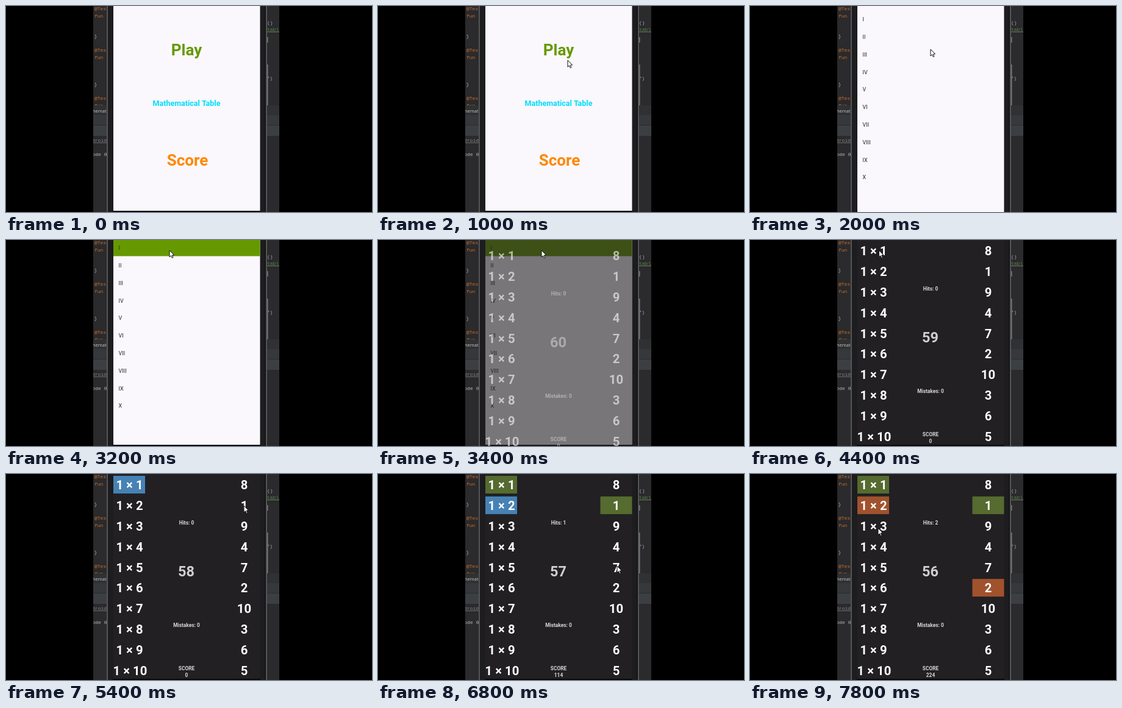
An HTML page with a canvas for the animation above (8 s loop, 600 by 338 pixels).

```html
<!DOCTYPE html>
<html lang="en">
<head>
<meta charset="utf-8">
<title>Times table game</title>
<style>
html, body { margin: 0; width: 100%; height: 100%; overflow: hidden; background: #000; }
canvas { display: block; width: 600px; height: 338px; }
</style>
</head>
<body>
<canvas id="stage" width="600" height="338"></canvas>
<script>
const ctx = document.getElementById('stage').getContext('2d');
const LOOP = 8000, STEP = 200;
const ROBOTO = 'Roboto, sans-serif';
const MONO = '"Liberation Mono", monospace';
const UI = '"Open Sans", sans-serif';
const BLUE = '#4682b4', OLIVE = '#556b2f', SIENNA = '#a0522d', LEAF = '#669900';
const ROMAN = ['I', 'II', 'III', 'IV', 'V', 'VI', 'VII', 'VIII', 'IX', 'X'];
const ANSWERS = [8, 1, 9, 4, 7, 2, 10, 3, 6, 5];

// Pointer stops: time, x, y
const PATH = [
  [200, 440, 245], [1200, 296, 71], [2200, 296, 71], [3000, 268, 17],
  [3800, 268, 17], [4600, 201, 17], [4800, 201, 17], [5400, 390, 52],
  [5600, 390, 52], [6200, 204, 49], [6400, 204, 49], [6800, 392, 151],
  [7000, 390, 177], [7400, 390, 177], [7800, 210, 89], [8000, 210, 89]
];

const clamp = v => Math.min(1, Math.max(0, v));
const mix = (a, b, k) => a + (b - a) * k;
const smooth = k => k * k * (3 - 2 * k);

function rect(x, y, w, h, color) {
  ctx.fillStyle = color;
  ctx.fillRect(x, y, w, h);
}

// Places text so that its capitals are centred on y.
function label(text, x, y, size, color, { weight = 700, family = ROBOTO, align = 'center' } = {}) {
  ctx.font = `${weight} ${size}px ${family}`;
  ctx.textAlign = align;
  ctx.fillStyle = color;
  ctx.fillText(text, x, y + size * 0.356);
}

const code = (text, x, y, color) =>
  label(text, x, y, 8, color, { weight: 400, family: MONO, align: 'left' });
const ui = (text, x, y, color) =>
  label(text, x, y, 7.5, color, { weight: 400, family: UI, align: 'left' });

function drawEditor() {
  rect(0, 0, 600, 338, '#000');
  ctx.save();
  ctx.beginPath();
  ctx.rect(143, 0, 305, 338);
  ctx.clip();
  rect(143, 0, 305, 338, '#2b2a2c');
  for (const y of [4, 72, 151]) {
    code('@Test', 145, y, '#c8702c');
    code('fun', 145, y + 12, '#c8702c');
  }
  for (const y of [49.5, 128.5]) code('}', 144.5, y, '#a9b0b8');
  code('()', 428, 27, '#a9b0b8');
  code('table', 428, 38.5, '#5f8453');
  rect(428, 42, 20, 1, '#5f8453');
  code('")', 427.5, 118, '#a9b0b8');
  rect(428, 51, 1.5, 9, '#77797b');
  rect(428, 96, 1.5, 80, '#77797b');

  rect(143, 163, 305, 16, '#303133');
  rect(143, 179, 305, 16, '#36383b');
  rect(143, 195, 305, 1, '#292b2d');
  rect(143, 196, 305, 17, '#3c3f42');
  rect(143, 213, 305, 125, '#2b2a2c');
  ui('hematical', 142, 172, '#c8c8c8');
  code('droid', 141, 220.5, '#85888a');
  rect(143, 224, 22, 1, '#686b6d');
  code('ode 0', 141.5, 243, '#b4b6b8');
  ctx.restore();

  rect(165, 0, 263, 338, '#1d1c1f');
  rect(165, 0, 2, 338, '#555557');
  rect(426, 0, 2, 338, '#555557');
  rect(424, 0, 2, 338, '#151517');
  rect(175, 336, 242, 2, '#080809');
}

function sheet(dy, color) {
  rect(176, 0, 240.5, Math.min(338, 336 + dy), color);
}

function drawMenu() {
  sheet(0, '#faf8fc');
  label('Play', 296, 72, 26, LEAF);
  label('Mathematical Table', 296, 159.5, 12.5, '#00ddff');
  label('Score', 297.5, 253, 26, '#ff8800');
}

function drawList(dy, pressed) {
  sheet(dy, '#faf8fc');
  if (pressed) rect(176, 0, 240.5, 26.5, LEAF);
  ROMAN.forEach((n, i) =>
    label(n, 184.5, 13 + i * 28.8 + dy, 9, '#262626', { weight: 400, align: 'left' }));
}

function drawGame(t, dy) {
  sheet(dy, '#222023');
  const hits = (t >= 5600) + (t >= 7400);
  const left = [
    t < 4600 ? null : hits ? OLIVE : BLUE,
    t < 6400 ? null : hits > 1 ? SIENNA : BLUE
  ];
  const right = { 1: hits ? OLIVE : null, 5: hits > 1 ? SIENNA : null };
  ANSWERS.forEach((answer, i) => {
    const y = 18 + i * 33.83 + dy;
    if (left[i]) rect(176, y - 15, 52, 29, left[i]);
    if (right[i]) rect(364.5, y - 15, 52, 29, right[i]);
    label(`1 × ${i + 1}`, i === 9 ? 203.5 : 202.5, y, 20.3, '#fff');
    label(answer, 390.5, y, 20.3, '#fff');
  });
  const seconds = 60 - Math.max(0, Math.floor((t - 3300) / 1000));
  const note = (text, y) => label(text, 296, y + dy, 8.4, '#d6d6d6');
  note(`Hits: ${hits}`, 80);
  label(seconds, 295.5, 160 + dy, 23.5, '#cfcfcf');
  note('Mistakes: 0', 248);
  note('SCORE', 319.5);
  note([0, 114, 224][hits], 330.5);
}

function drawPointer(t) {
  const i = PATH.findIndex(p => p[0] > t);
  if (i < 1) return;
  const [t0, x0, y0] = PATH[i - 1], [t1, x1, y1] = PATH[i];
  const k = smooth((t - t0) / (t1 - t0));
  ctx.save();
  ctx.translate(mix(x0, x1, k), mix(y0, y1, k));
  ctx.beginPath();
  for (const [x, y] of [[0, 0], [0, 11], [2.5, 8.7], [4.3, 12.5], [6, 11.7], [4.3, 8], [7.6, 7.7]])
    ctx.lineTo(x, y);
  ctx.closePath();
  ctx.fillStyle = '#fff';
  ctx.fill();
  ctx.lineWidth = 1;
  ctx.strokeStyle = '#111';
  ctx.stroke();
  ctx.restore();
}

// A new screen fades in while it rises into place.
function enter(t, start, rise, paint) {
  if (t < start) return;
  ctx.save();
  ctx.globalAlpha = clamp((t - start + 120) / 200);
  paint(Math.round(rise * Math.pow(1 - clamp((t - start) / 400), 2)));
  ctx.restore();
}

function draw(t) {
  drawEditor();
  if (t < 2000) drawMenu();
  if (t < 3600) enter(t, 1800, 36, dy => drawList(dy, t >= 3200));
  enter(t, 3400, 8, dy => drawGame(t, dy));
  drawPointer(t);
}

const begin = performance.now();
function tick() {
  const t = Math.max(0, performance.now() - begin) % LOOP;
  draw(Math.floor(t / STEP) * STEP);
  requestAnimationFrame(tick);
}
tick();
</script>
</body>
</html>
```
